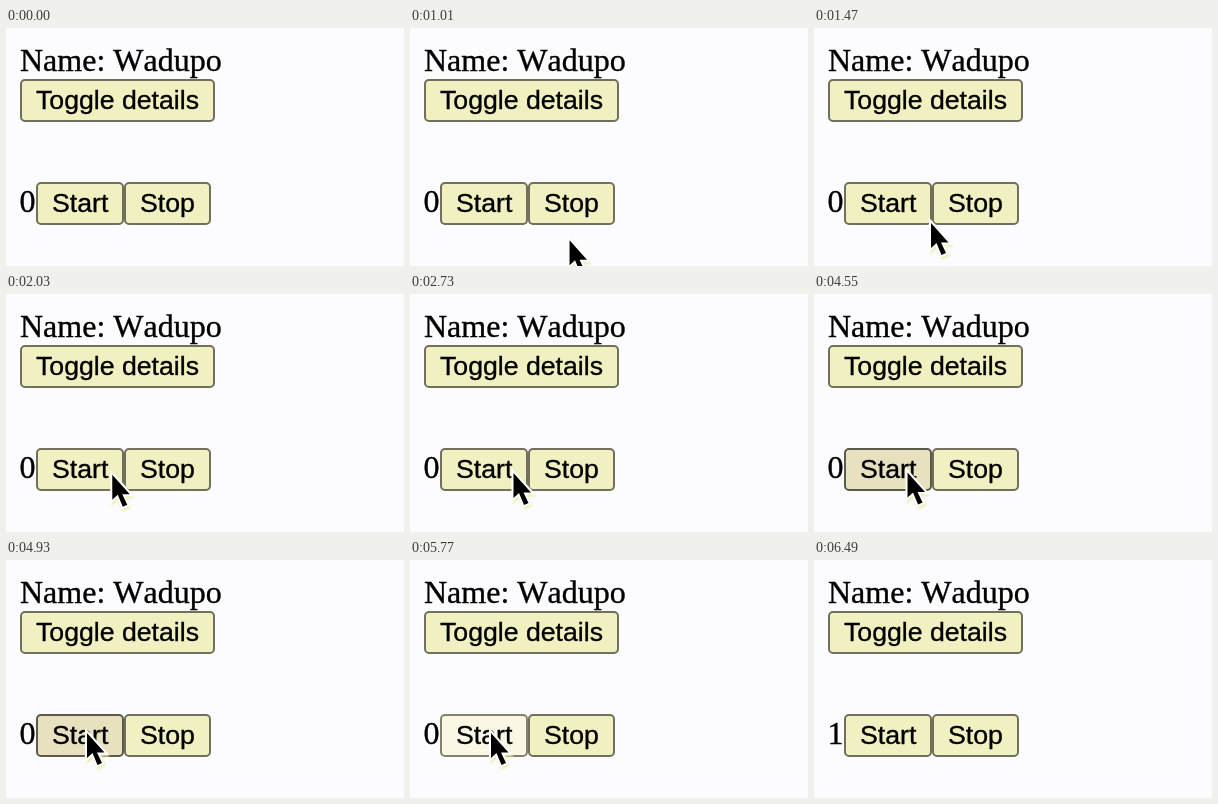
Recreate the animation shown at these times as an HTML page. Size 398 px wide and 238 px high, loop 8000 ms.

```html
<!DOCTYPE html>
<html lang="en">
<head>
<meta charset="utf-8">
<title>Counter demo</title>
<style>
  html, body { margin: 0; width: 100%; height: 100%; overflow: hidden; background: #fcfcff; }
  svg { display: block; }
  text { stroke: #000; stroke-width: .35; }
  .label { font: 32px "Liberation Serif", Times, serif; font-kerning: none; }
  .button text { font: 26.667px "Liberation Sans", Arial, sans-serif; }
  .button rect { fill: #f1f0c0; stroke: #70705c; stroke-width: 2; }
  .button.hover rect { fill: #e7e1c0; stroke: #5b5a4a; }
  .button.active rect { fill: #faf8e4; stroke: #83826c; }
  #cursor { fill: #000; stroke: #fff; stroke-width: 4; paint-order: stroke; filter: drop-shadow(1px 2px 1px #eeedb0); }
</style>
</head>
<body>
<svg width="398" height="238" viewBox="0 0 398 238">
  <text class="label" x="14" y="43">Name: Wadupo</text>
  <g class="button">
    <rect x="15" y="52" width="193" height="41" rx="4"/>
    <text x="30" y="81">Toggle details</text>
  </g>
  <text class="label" id="count" x="13.5" y="184">0</text>
  <g class="button" id="start">
    <rect x="31" y="155" width="86" height="41" rx="4"/>
    <text x="46" y="184">Start</text>
  </g>
  <g class="button">
    <rect x="119" y="155" width="85" height="41" rx="4"/>
    <text x="134" y="184">Stop</text>
  </g>
  <path id="cursor" d="M0 0V25L5.5 20L10.5 32L15 30L10 19.5H17.5Z"/>
</svg>
<script>
  const DURATION = 8000;
  const HOVER = 4250, PRESS = 5770, RELEASE = 6090, LEAVE = 6400;

  // Each move starts where the previous one ended; powers ease x and y separately.
  const entry = { x: 162, y: 240 };
  const moves = [
    { start: 730, end: 1470, x: 117, y: 195, powerX: 3, powerY: 0.5 },
    { start: 1570, end: 2150, x: 103.5, y: 179, powerX: 1, powerY: 0.5 },
    { start: HOVER, end: 4930, x: 81, y: 173, powerX: 1, powerY: 3 },
    { start: 6310, end: 6490, x: 74, y: 245, powerX: 1, powerY: 1 }
  ];
  const firstMove = moves[0], lastMove = moves[moves.length - 1];

  const count = document.getElementById("count");
  const start = document.getElementById("start");
  const cursor = document.getElementById("cursor");

  function pointerAt(time) {
    let { x, y } = entry;
    for (const move of moves) {
      const progress = (time - move.start) / (move.end - move.start);
      const k = Math.min(1, Math.max(0, progress));
      x += (move.x - x) * k ** move.powerX;
      y += (move.y - y) * k ** move.powerY;
    }
    return [x, y];
  }

  function buttonState(time) {
    if (time >= PRESS && time < RELEASE) return "active";
    return time >= HOVER && time < LEAVE ? "hover" : "";
  }

  function draw(time) {
    const visible = time >= firstMove.start && time < lastMove.end;
    cursor.style.display = visible ? "" : "none";
    cursor.setAttribute("transform", `translate(${pointerAt(time)})`);
    start.setAttribute("class", `button ${buttonState(time)}`);
    count.textContent = time >= RELEASE ? "1" : "0";
  }

  const begin = performance.now();
  function tick() {
    draw((performance.now() - begin) % DURATION);
    requestAnimationFrame(tick);
  }
  tick();
</script>
</body>
</html>
```
